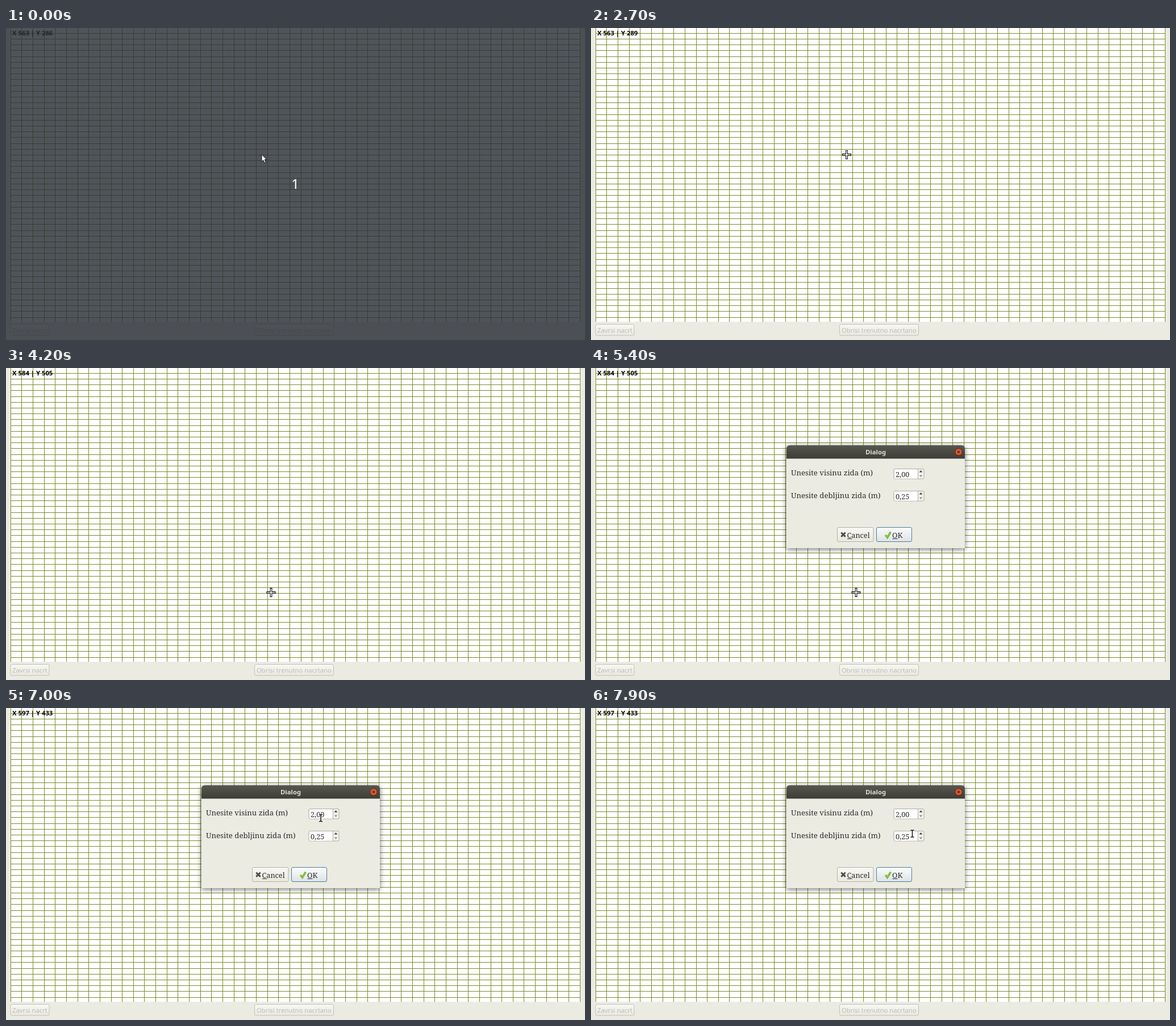
An HTML page that plays this animation: 1019x549 px, repeating every 8000 ms.

```html
<!DOCTYPE html>
<html lang="sr">
<head>
<meta charset="utf-8">
<title>Nacrt</title>
<style>
html, body { margin: 0; width: 100%; height: 100%; overflow: hidden; background: #ecebe2; }
svg { display: block; width: 1019px; height: 549px; }
text { font-family: "Noto Sans", "Open Sans", sans-serif; font-size: 11.3px; white-space: pre; }
.bold { font-weight: 700; }
.off { fill: #bdbbb4; }
.serif text { font-family: "Noto Serif", "Liberation Serif", serif; font-size: 13.2px; fill: #2d2d2b; }
.serif .small { font-size: 12.7px; }
.btn { fill: url(#face); stroke: #c3c1b7; }
#win { filter: drop-shadow(0 2px 5px rgba(0, 0, 0, .55)); }
</style>
</head>
<body>
<svg viewBox="0 0 1019 549">
  <defs>
    <linearGradient id="face" x2="0" y2="1"><stop stop-color="#f8f8f4"/><stop offset="1" stop-color="#e9e8df"/></linearGradient>
    <linearGradient id="okFace" x2="0" y2="1"><stop stop-color="#fbfcfc"/><stop offset="1" stop-color="#dde3e5"/></linearGradient>
    <linearGradient id="bar" x2="0" y2="1"><stop stop-color="#59584e"/><stop offset="1" stop-color="#3d3c36"/></linearGradient>
    <g id="spin">
      <rect x="533" y="177.5" width="53" height="17.5" rx="2" fill="#f4f3ee" stroke="#aeaca3"/>
      <path d="M534 178h41v16.5h-41z" fill="#fff"/>
      <path d="M575.5 178v17" stroke="#aeaca3"/>
      <path d="M577.5 183.5l3-3.6 3 3.6z" fill="#45443f"/>
      <path d="M577.5 188.5l3 3.4 3-3.4z" fill="#96948c"/>
    </g>
  </defs>

  <rect width="1019" height="549" fill="#ecebe2"/>
  <rect x="8" width="1003" height="517" fill="#fff"/>
  <path id="grid" fill="#7d8b2c" shape-rendering="crispEdges"/>
  <text id="pos" class="bold" x="11" y="13.3"></text>

  <rect class="btn" x="8" y="521.5" width="68" height="19.5" rx="2.5"/>
  <text class="off" x="11" y="535.7">Zavrsi nacrt</text>
  <rect class="btn" x="437.5" y="521.5" width="139" height="19.5" rx="2.5"/>
  <text class="off" x="441" y="535.7">Obrisi trenutno nacrtano</text>

  <g id="dialog">
    <path id="win" d="M344 317V142q0-6 6-6H652q6 0 6 6V317z" fill="#ecebe2"/>
    <path d="M344 159.5V142q0-6 6-6H652q6 0 6 6V159.5z" fill="url(#bar)"/>
    <text class="bold" x="501" y="151.5" text-anchor="middle" fill="#e0dcd2">Dialog</text>
    <circle cx="647" cy="147.7" r="6.2" fill="#e6562f" stroke="#33302a"/>
    <path d="M645 145.7l4 4m0-4l-4 4" stroke="#5a2415" stroke-width="1.3"/>
    <g class="serif">
      <text x="352" y="189.3">Unesite visinu zida (m)</text>
      <text x="352" y="228.5">Unesite debljinu zida (m)</text>
      <use href="#spin"/>
      <use href="#spin" y="39"/>
      <text class="small" x="536" y="191.5">2,00</text>
      <text class="small" x="536" y="230.5">0,25</text>
      <rect class="btn" x="433.5" y="280.5" width="63.5" height="25" rx="2.5" style="stroke:#b3b1a8"/>
      <path d="M440.3 289.5l7.4 7.4m0-7.4l-7.4 7.4" stroke="#4c4e4b" stroke-width="3"/>
      <text class="small" x="450.5" y="298.5">Cancel</text>
      <rect x="502.5" y="280.5" width="62" height="25" rx="2.5" fill="url(#okFace)" stroke="#4d7ba0"/>
      <path d="M518.2 294l3.4 4.2 5.8-9.6" fill="none" stroke="#5a9a1c" stroke-width="3.2"/>
      <path d="M518.2 294l3.4 4.2 5.8-9.6" fill="none" stroke="#98d545" stroke-width="1.6"/>
      <text class="small" x="530" y="298.5">OK</text>
      <path d="M451 300.5h8.5M530.5 300.5h9" stroke="#2d2d2b"/>
    </g>
  </g>

  <g id="veil">
    <rect width="1019" height="549" fill="rgb(40,45,52)" fill-opacity=".81"/>
    <text x="509" y="283" text-anchor="middle" fill="#fff" style="font-size:24px">1</text>
  </g>

  <path id="arrow" d="M0 .5V13.2l2.9-2.7 2.2 4.9 2.3-1-2.2-4.8h3.6z" fill="#fff" stroke="#111"/>
  <g id="cross" fill="none">
    <path d="M-8 0H8M0-8V8" stroke="#000" stroke-width="3.8"/>
    <path d="M-7 0H7M0-7V7" stroke="#fff" stroke-width="1.7"/>
  </g>
  <g id="beam" fill="none">
    <path d="M-3-6.3h6M-3 6.3h6M0-6.3V6.3" stroke="#fff" stroke-width="3"/>
    <path d="M-3-6.3q3 0 3 1.5q0-1.5 3-1.5M-3 6.3q3 0 3-1.5q0 1.5 3 1.5M0-6V6" stroke="#111" stroke-width="1.5"/>
  </g>
</svg>
<script>
const LOOP = 8000;
const $ = id => document.getElementById(id);
const show = (el, on) => { el.style.display = on ? '' : 'none'; };

let lines = '';
for (let i = 0; i < 52; i++) lines += `M${Math.floor(8.2 + i * 19.647)} 0h1v517h-1z`;
for (let i = 0; i < 50; i++) lines += `M8 ${Math.floor(9.2 + i * 10.204)}h1003v1H8z`;
$('grid').setAttribute('d', lines);

// time, pointer, x, y
const moves = [
  [0, 'arrow', 450, 222], [100, 'cross', 450, 223],
  [2800, 'cross', 430, 320], [2900, 'arrow', 375.5, 525],
  [3100, '', 0, 0], [3400, 'arrow', 365.5, 542],
  [4000, 'cross', 404, 480], [4100, 'cross', 455, 420], [4200, 'cross', 466.5, 395],
  [6300, 'cross', 477, 338], [6400, 'arrow', 530, 240],
  [6500, 'arrow', 552.5, 202], [6700, 'arrow', 552.5, 201],
  [6900, 'beam', 552.5, 195], [7000, 'beam', 554, 193.5],
  [7200, 'arrow', 553.5, 198], [7300, 'arrow', 553.5, 204], [7400, 'arrow', 554.5, 211],
  [7500, 'arrow', 554.5, 209], [7600, 'arrow', 555.5, 207],
  [7800, 'arrow', 560.5, 211], [7900, 'beam', 565.5, 221]
];

// time, X, Y
const readings = [
  [0, 563, 286], [2700, 563, 289], [2800, 538, 411], [2900, 485, 630],
  [4000, 505, 612], [4100, 569, 536], [4200, 584, 505], [6300, 597, 433]
];

const at = (table, t) => table.findLast(row => row[0] <= t);

function draw(t) {
  const [, kind, x, y] = at(moves, t);
  for (const id of ['arrow', 'cross', 'beam']) show($(id), id === kind);
  if (kind) $(kind).setAttribute('transform', `translate(${x} ${y})`);
  const [, px, py] = at(readings, t);
  $('pos').textContent = `X ${px} | Y ${py}`;
  show($('veil'), t < 100);
  show($('dialog'), t >= 5400);
}

const start = performance.now();
function tick() {
  draw((performance.now() - start) % LOOP);
  requestAnimationFrame(tick);
}
tick();
</script>
</body>
</html>
```
